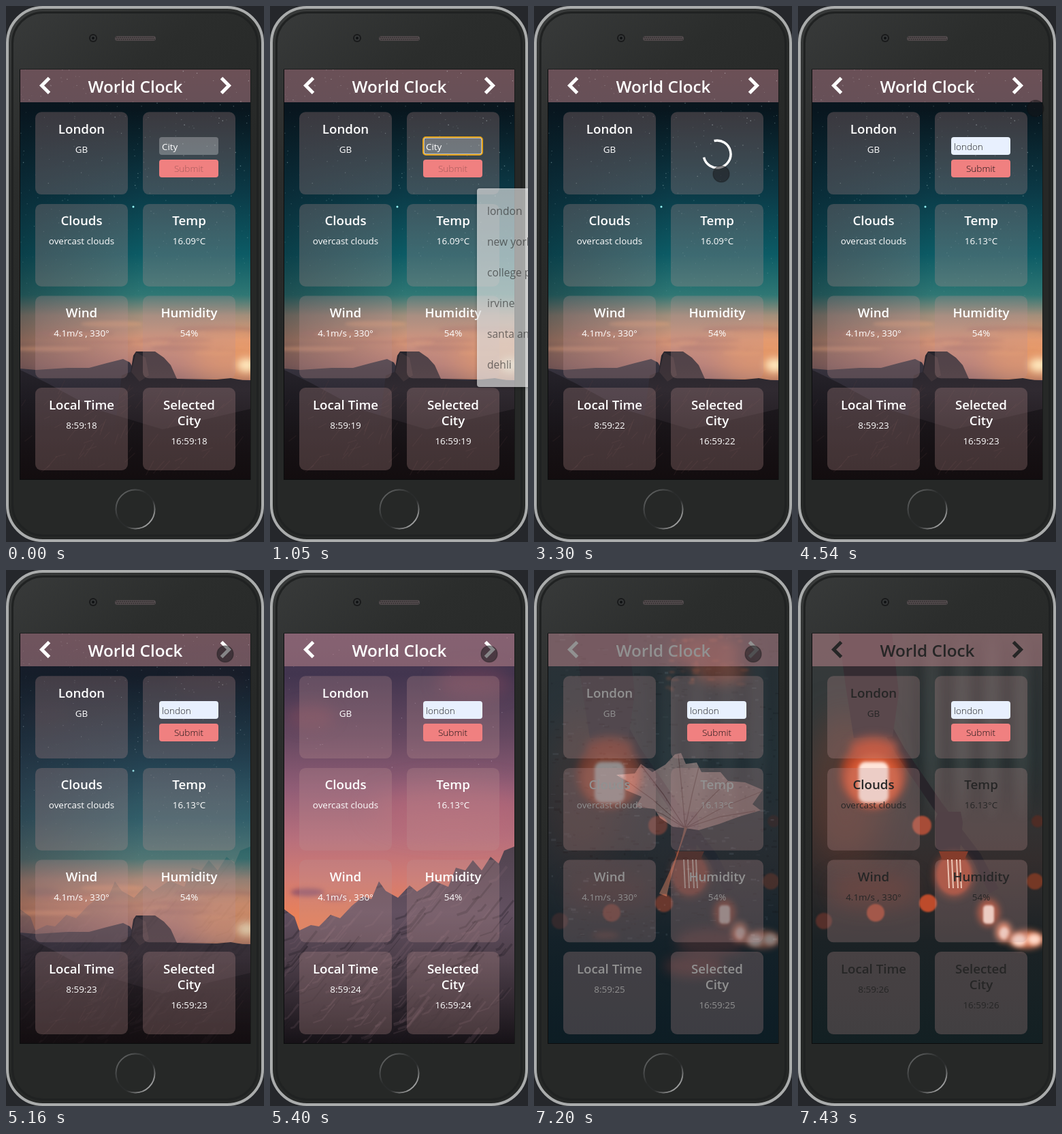
These frames come from a looping animation (379x785 px, 8000 ms). An HTML page with a canvas:

```html
<!DOCTYPE html>
<html lang="en">
<head>
<meta charset="utf-8">
<title>World Clock</title>
<style>
html, body { margin: 0; width: 379px; height: 785px; overflow: hidden; background: #26282a; }
canvas { display: block; }
</style>
</head>
<body>
<canvas id="stage" width="379" height="785"></canvas>
<script>
const W = 379, H = 785, LOOP = 8000, TAU = Math.PI * 2;
const ctx = document.getElementById('stage').getContext('2d');
const FONT = '"Open Sans", "Noto Sans", sans-serif';
const clamp = v => Math.max(0, Math.min(1, v));

let seed = 7;
const rnd = (a = 0, b = 1) => {
  seed = (seed * 16807) % 2147483647;
  return a + (b - a) * seed / 2147483647;
};

// Drawing helpers
function layer(paint) {
  const c = document.createElement('canvas');
  c.width = W; c.height = H;
  paint(c.getContext('2d'));
  return c;
}
function gradient(g, x0, y0, x1, y1, stops) {
  const fill = g.createLinearGradient(x0, y0, x1, y1);
  stops.forEach(([at, color]) => fill.addColorStop(at, color));
  return fill;
}
const vertical = (g, stops) => gradient(g, 0, 93, 0, 693, stops);
function box(g, x, y, w, h, r, fill) {
  g.beginPath();
  g.roundRect(x, y, w, h, r);
  g.fillStyle = fill;
  g.fill();
}
function outline(g, x, y, w, h, r, color, width) {
  g.beginPath();
  g.roundRect(x, y, w, h, r);
  g.strokeStyle = color;
  g.lineWidth = width;
  g.stroke();
}
function poly(g, points, fill) {
  g.beginPath();
  for (let i = 0; i < points.length; i += 2) g.lineTo(points[i], points[i + 1]);
  g.closePath();
  g.fillStyle = fill;
  g.fill();
}
function line(g, points, color, width) {
  g.beginPath();
  for (let i = 0; i < points.length; i += 2) g.lineTo(points[i], points[i + 1]);
  g.strokeStyle = color;
  g.lineWidth = width;
  g.stroke();
}
function blob(g, x, y, rx, ry, color, blur = 0) {
  g.filter = blur ? `blur(${blur}px)` : 'none';
  g.beginPath();
  g.ellipse(x, y, rx, ry, 0, 0, TAU);
  g.fillStyle = color;
  g.fill();
  g.filter = 'none';
}
function text(g, str, x, y, size, color, weight = 400, align = 'center') {
  g.font = `${weight} ${size}px ${FONT}`;
  g.textAlign = align;
  g.fillStyle = color;
  g.fillText(str, x, y);
}

// Wallpapers
function duskDome(g) {
  g.fillStyle = vertical(g, [[0, '#14151c'], [.1, '#08161e'], [.3, '#0b3a47'], [.45, '#0c5b65'],
    [.55, '#2f7774'], [.6, '#a08e7c'], [.66, '#d59579'], [.72, '#b87d74'], [.78, '#7a5a60']]);
  g.fillRect(21, 93, 338, 600);
  g.fillStyle = gradient(g, 21, 0, 200, 0, [[0, 'rgba(8,22,32,.4)'], [1, 'rgba(8,22,32,0)']]);
  g.fillRect(21, 93, 338, 600);
  for (let i = 0; i < 430; i++) {
    const y = rnd(93, 430), s = rnd(.5, 1.4);
    g.fillStyle = `rgba(190,225,225,${rnd(.15, .75) * (1 - (y - 93) / 400)})`;
    g.fillRect(rnd(21, 358), y, s, s);
  }
  blob(g, 187, 294, 1.5, 1.5, '#9ff');
  for (let i = 0; i < 14; i++)
    blob(g, rnd(60, 350), rnd(455, 515), rnd(25, 70), rnd(2, 5), i % 2 ? 'rgba(235,165,125,.35)' : 'rgba(150,100,100,.3)', 2);
  blob(g, 345, 520, 75, 38, 'rgba(255,165,95,.6)', 20);
  blob(g, 354, 526, 15, 10, '#ffe9bd', 6);
  poly(g, [21, 531, 44, 533, 90, 530, 122, 530, 148, 523, 172, 517, 182, 522, 195, 545, 359, 548, 359, 693, 21, 693],
    vertical(g, [[.7, '#3a3641'], [.82, '#292630'], [1, '#150f11']]));
  poly(g, [170, 541, 183, 536, 187, 512, 191, 506, 219, 506, 232, 515, 242, 526, 251, 546, 290, 549, 330, 545, 359, 550,
    359, 693, 150, 693], vertical(g, [[.68, '#26242b'], [.78, '#302a31'], [1, '#120d0f']]));
  poly(g, [191, 507, 205, 515, 210, 541, 196, 550, 184, 536], 'rgba(85,68,72,.4)');
  poly(g, [21, 533, 60, 552, 130, 590, 230, 620, 359, 590, 359, 693, 21, 693],
    vertical(g, [[.75, 'rgba(25,23,28,.6)'], [1, '#130d0f']]));
  for (let i = 0; i < 60; i++) {
    const x = rnd(21, 340), y = rnd(565, 690);
    line(g, [x, y, x + rnd(5, 18), y - rnd(4, 22)], 'rgba(100,70,72,.14)', 1.5);
  }
}

function purplePeaks(g) {
  g.fillStyle = vertical(g, [[0, '#4c3a55'], [.1, '#42354f'], [.25, '#654860'], [.38, '#915d76'],
    [.5, '#b76f7c'], [.6, '#d27b72'], [.7, '#ec8156'], [1, '#ec8156']]);
  g.fillRect(21, 93, 338, 600);
  blob(g, 300, 165, 55, 22, 'rgba(145,75,95,.4)', 12);
  blob(g, 60, 215, 35, 18, 'rgba(140,75,90,.4)', 10);
  blob(g, 270, 350, 120, 35, 'rgba(205,110,120,.35)', 18);
  blob(g, 55, 472, 25, 6, '#98586a', 3);
  blob(g, 95, 480, 18, 4, '#a45f68', 3);
  for (let i = 0; i < 45; i++) {
    g.fillStyle = `rgba(235,215,235,${rnd(.15, .6)})`;
    g.fillRect(rnd(21, 358), rnd(93, 290), 1, 1);
  }
  const ridge = [21, 497, 36, 508, 43, 528, 60, 520, 72, 522, 89, 505, 103, 510, 120, 492, 137, 478, 149, 482, 160, 456,
    170, 470, 188, 480, 205, 462, 216, 471, 240, 455, 262, 464, 273, 436, 287, 440, 298, 425, 311, 440, 324, 420,
    336, 430, 344, 411, 359, 405, 359, 693, 21, 693];
  poly(g, ridge, vertical(g, [[.52, '#51434f'], [.68, '#625060'], [.8, '#4c3e49'], [1, '#161217']]));
  g.save();
  g.clip();
  for (let i = 0; i < 260; i++) {
    const x = rnd(21, 359), y = rnd(425, 690), d = rnd(8, 32);
    const color = i % 2 ? 'rgba(28,22,30,.28)' : 'rgba(145,112,125,.16)';
    line(g, [x, y, x - d * .8, y + d, x - d * 1.4, y + d * 1.2], color, rnd(1, 4));
  }
  g.restore();
}

function fallenLeaf(g) {
  g.fillStyle = vertical(g, [[0, '#1d2932'], [.3, '#1e2f3a'], [.6, '#172834'], [.8, '#0b1f2c'], [1, '#071a27']]);
  g.fillRect(21, 93, 338, 600);
  for (let i = 0; i < 650; i++) {
    const y = rnd(93, 540);
    g.fillStyle = i % 3 ? 'rgba(8,16,24,.4)' : `rgba(115,145,160,${rnd(.06, .32)})`;
    g.fillRect(rnd(21, 355), y, rnd(2, 9), rnd(1, 3.5));
  }
  blob(g, 255, 120, 50, 24, 'rgba(180,75,55,.75)', 10);
  blob(g, 275, 150, 38, 18, 'rgba(210,85,55,.6)', 8);
  for (let i = 0; i < 35; i++)
    blob(g, rnd(195, 320), rnd(96, 185), rnd(2, 7), rnd(1, 3), `rgba(235,105,65,${rnd(.15, .6)})`, 1.5);
  blob(g, 260, 545, 52, 20, 'rgba(130,65,65,.6)', 8);
  blob(g, 235, 580, 45, 16, 'rgba(155,65,60,.55)', 8);
  blob(g, 105, 535, 20, 5, 'rgba(150,75,60,.5)', 4);
  const leaf = [121, 300, 148, 298, 157, 284, 174, 296, 193, 285, 207, 270, 216, 268, 223, 284, 239, 282, 246, 296,
    274, 296, 285, 309, 310, 311, 336, 322, 321, 343, 333, 352, 302, 361, 272, 372, 242, 381, 222, 378, 204, 376,
    185, 363, 177, 350, 149, 347, 158, 332, 134, 322, 141, 312];
  poly(g, leaf, gradient(g, 130, 280, 320, 370, [[0, '#a98b8e'], [.5, '#c1a2a2'], [1, '#9c7c7f']]));
  g.save();
  g.clip();
  for (let i = 0; i < 220; i++) {
    g.fillStyle = i % 2 ? 'rgba(105,75,82,.35)' : 'rgba(235,210,208,.3)';
    g.fillRect(rnd(121, 335), rnd(268, 380), rnd(1, 5), rnd(1, 3));
  }
  for (const [x, y] of [[125, 301], [158, 287], [212, 270], [243, 285], [285, 309], [333, 325], [325, 353], [155, 345]])
    line(g, [222, 378, (222 + x) / 2, (378 + y) / 2 - 4, x, y], 'rgba(110,65,65,.65)', 1.3);
  g.restore();
  g.beginPath();
  g.moveTo(221, 376);
  g.quadraticCurveTo(214, 415, 184, 474);
  g.lineTo(195, 478);
  g.quadraticCurveTo(202, 440, 225, 378);
  g.fillStyle = gradient(g, 0, 378, 0, 478, [[0, '#a9725f'], [.5, '#c2694b'], [1, '#c98a73']]);
  g.fill();
}

function stringLights(g) {
  g.fillStyle = vertical(g, [[0, '#37393a'], [.3, '#30393a'], [.55, '#332d2d'], [.75, '#1b2225'], [1, '#132023']]);
  g.fillRect(21, 93, 338, 600);
  for (let i = 0; i < 9; i++)
    blob(g, 175 + i * 22, 230, 7, 130, i % 2 ? 'rgba(90,100,98,.25)' : 'rgba(18,25,27,.35)', 7);
  blob(g, 70, 320, 60, 110, 'rgba(120,60,45,.45)', 25);
  blob(g, 110, 470, 65, 25, 'rgba(120,45,32,.4)', 16);
  line(g, [105, 185, 150, 265, 205, 345, 262, 420, 288, 470], '#28242a', 15);
  poly(g, [60, 93, 138, 93, 148, 180, 139, 244, 82, 246, 70, 170], '#352c32');
  blob(g, 111, 258, 36, 16, '#8d4030', 6);
  blob(g, 111, 300, 48, 49, 'rgba(220,75,38,.7)', 6);
  blob(g, 111, 307, 38, 38, '#d75a35', 5);
  g.filter = 'blur(2px)';
  box(g, 89, 281, 44, 60, 10, '#ffe5da');
  g.filter = 'none';
  for (const [x, y, r, color] of [[182, 374, 14, '#a74c37'], [191, 488, 13, '#bd4b2b'], [114, 502, 13, '#9a432f'],
    [38, 514, 12, '#552f2a'], [348, 456, 12, '#753825'], [352, 368, 9, '#4e2c25']])
    blob(g, x, y, r, r, color, 1);
  poly(g, [206, 354, 239, 354, 242, 370, 238, 410, 203, 410, 201, 368], '#28232a');
  blob(g, 229, 447, 31, 35, 'rgba(210,85,55,.35)', 5);
  blob(g, 229, 446, 26, 30, 'rgba(190,75,48,.75)', 2);
  poly(g, [207, 412, 250, 412, 244, 425, 212, 425], '#843c2b');
  for (const x of [220, 226, 233, 238]) line(g, [x, 424, x + 2, 466], '#ffd9c2', 2);
  blob(g, 280, 502, 16, 20, 'rgba(215,85,50,.75)', 5);
  g.filter = 'blur(1.5px)';
  box(g, 272, 491, 16, 27, 5, '#ffe2d4');
  g.filter = 'none';
  blob(g, 302, 530, 12, 15, '#e48664', 4);
  blob(g, 303, 532, 7, 9, '#ffe0d2', 2);
  blob(g, 335, 541, 27, 13, '#e27b55', 5);
  blob(g, 325, 542, 11, 9, '#ffe1d4', 3);
  blob(g, 347, 541, 10, 8, '#ffd9c8', 3);
}

const clipped = paint => layer(g => {
  g.beginPath();
  g.rect(21, 93, 338, 600);
  g.clip();
  paint(g);
});
const wallpapers = [duskDome, purplePeaks, fallenLeaf, stringLights].map(clipped);

const phone = layer(g => {
  g.fillStyle = '#25272b';
  g.fillRect(0, 0, W, H);
  box(g, 2, 2, 375, 781, 52, gradient(g, 0, 0, 260, 300, [[0, '#393b3b'], [.5, '#2b2d2c'], [1, '#262827']]));
  outline(g, 2, 2, 375, 781, 52, '#aaacac', 4);
  outline(g, 9.5, 9.5, 360, 766, 45, '#202222', 3);
  blob(g, 128, 47, 6, 6, '#191a1b');
  blob(g, 128, 47, 4, 4, '#343637');
  blob(g, 128, 47, 2, 2, '#101214');
  box(g, 160, 44, 60, 7, 3.5, '#514a4c');
  for (let x = 162; x < 219; x += 3)
    for (let k = 0; k < 2; k++) blob(g, x + k * 1.5, 46 + k * 3, .8, .8, '#292627');
  g.beginPath();
  g.arc(190, 737, 28.5, 0, TAU);
  g.strokeStyle = gradient(g, 169, 716, 211, 758, [[0, '#5d5f5f'], [.4, '#292b2b'], [.65, '#2b2d2d'], [1, '#a6a7a7']]);
  g.lineWidth = 2;
  g.stroke();
  g.fillStyle = '#0b0c0d';
  g.fillRect(20, 92.5, 339.5, 601.5);
});

// Timeline
const fades = [[5160, 5400], [6180, 6500], [7120, 7430]];
function fadeAmount(t, [start, end]) {
  if (t < start) return 0;
  const held = t >= end ? end : start + Math.floor((t - start) / 79) * 79;
  return Math.sin(clamp((held - start + 40) / (end - start + 40)) * Math.PI / 2);
}

// [start, x, y]; an entry without a place hides the touch pointer
const touches = [[120, 325, 773], [210, 325, 700], [290], [440, 317, 130], [520], [2930, 275, 246], [3380],
  [3780, 243.5, 635], [3850], [4540, 349, 150], [4620, 345, 127], [4690, 339, 110], [4770, 332, 105],
  [4850, 326, 114], [4930, 322, 123], [7280]];

const suggestions = ['london', 'new york', 'college park', 'irvine', 'santa ana', 'dehli'];

function drawForm(t) {
  const preview = t >= 1450 && t < 1760, filled = t >= 1450;
  const focused = t >= 980 && t < 3000;
  box(ctx, 225, 192, 87, 26, 4, filled ? '#e8f0fe' : 'rgba(255,255,255,.27)');
  if (focused) {
    outline(ctx, 226, 193, 85, 24, 3, '#fff', 1);
    outline(ctx, 225, 192, 87, 26, 4, '#e3a21a', 2);
  }
  if (preview) {
    ctx.font = '12px "Liberation Sans", Arial, sans-serif';
    ctx.textAlign = 'left';
    ctx.fillStyle = '#222';
    ctx.fillText('london', 229, 211);
  } else if (filled) text(ctx, 'london', 229, 211, 13.5, '#222', 300, 'left');
  else text(ctx, 'City', 229, 211, 13.4, '#fff', 400, 'left');
  if (t >= 2530 && t < 2930) line(ctx, [274, 196, 274, 214], '#222', 1);
  box(ctx, 225, 225, 87, 26, 4, '#f08080');
  text(ctx, 'Submit', 268.5, 243, 13.6, t >= 2230 ? '#1c1416' : 'rgba(16,16,16,.32)', 300);
}

function drawSpinner(t) {
  const turn = (t - 3300) / 1000 * TAU;
  ctx.beginPath();
  ctx.arc(269, 217, 20, turn - 1.8, turn + 2.9);
  ctx.strokeStyle = '#fff';
  ctx.lineWidth = 3.5;
  ctx.stroke();
}

function drawSuggestions(t) {
  const shown = t < 1760 ? clamp((t - 930) / 200) : 1 - clamp((t - 1720) / 350);
  if (t < 980 || !shown) return;
  ctx.save();
  ctx.globalAlpha = shown;
  ctx.shadowColor = 'rgba(0,0,0,.4)';
  ctx.shadowBlur = 5;
  ctx.shadowOffsetY = 1;
  box(ctx, 304, 267, 120, 291, 4, '#fff');
  ctx.shadowColor = 'transparent';
  if (t >= 1450) {
    ctx.fillStyle = '#c8c8c8';
    ctx.fillRect(304, 278, 75, 45);
  }
  suggestions.forEach((city, i) => text(ctx, city, 319, 306 + i * 45, 15.6, '#222', 400, 'left'));
  if (t >= 1280) {
    const p = clamp((t - 1280) / 250);
    ctx.translate(372 - 40 * p, 347 - 30 * p);
    poly(ctx, [.5, .5, .5, 16, 4, 12.7, 6.6, 18.5, 9, 17.4, 6.5, 11.8, 11.3, 11.5], '#fff');
    ctx.strokeStyle = '#1d2433';
    ctx.lineWidth = 1;
    ctx.stroke();
  }
  ctx.restore();
}

function drawTouch(t) {
  const [, x, y] = touches.findLast(([start]) => t >= start) || [];
  if (x === undefined) return;
  blob(ctx, x, y, 12, 12, 'rgba(22,22,24,.52)');
  ctx.strokeStyle = 'rgba(15,15,17,.3)';
  ctx.lineWidth = 1.5;
  ctx.stroke();
}

function draw(t) {
  const amounts = fades.map(f => fadeAmount(t, f));
  ctx.drawImage(phone, 0, 0);
  ctx.drawImage(wallpapers[0], 0, 0);
  amounts.forEach((a, i) => {
    ctx.globalAlpha = a;
    ctx.drawImage(wallpapers[i + 1], 0, 0);
  });
  ctx.globalAlpha = 1;

  const tone = Math.round(255 - 217 * amounts[2]);
  const ink = `rgb(${tone},${tone},${tone})`;
  ctx.fillStyle = 'rgba(188,135,140,.52)';
  ctx.fillRect(21, 93, 338, 48);
  text(ctx, 'World Clock', 190, 127, 24.3, ink, 600);
  line(ctx, [63.5, 105.5, 52.5, 116.5, 63.5, 127.5], ink, 5);
  line(ctx, [316.5, 105.5, 327.5, 116.5, 316.5, 127.5], ink, 5);

  const second = 18 + Math.floor((t + 770) / 1000);
  const cards = [['London', 'GB'], null, ['Clouds', 'overcast clouds'], ['Temp', t < 3380 ? '16.09°C' : '16.13°C'],
    ['Wind', '4.1m/s , 330°'], ['Humidity', '54%'], ['Local Time', '8:59:' + second],
    ['Selected', '16:59:' + second, 'City']];
  cards.forEach((card, i) => {
    const x = i % 2 ? 201 : 43, y = 155.3 + (i >> 1) * 134.6, mid = x + 68;
    box(ctx, x, y, 136, 120.8, 9, 'rgba(188,143,143,.28)');
    if (!card) return;
    const [title, value, extra] = card;
    text(ctx, title, mid, y + 31.5, 18.7, ink, 600);
    if (extra) text(ctx, extra, mid, y + 55, 18.7, ink, 600);
    text(ctx, value, mid, y + (extra ? 82.5 : 59.5), 13.4, ink);
  });

  if (t >= 3000 && t < 3380) drawSpinner(t);
  else drawForm(t);
  drawSuggestions(t);
  drawTouch(t);
}

function tick() {
  draw(performance.now() % LOOP);
  requestAnimationFrame(tick);
}
tick();
</script>
</body>
</html>
```
